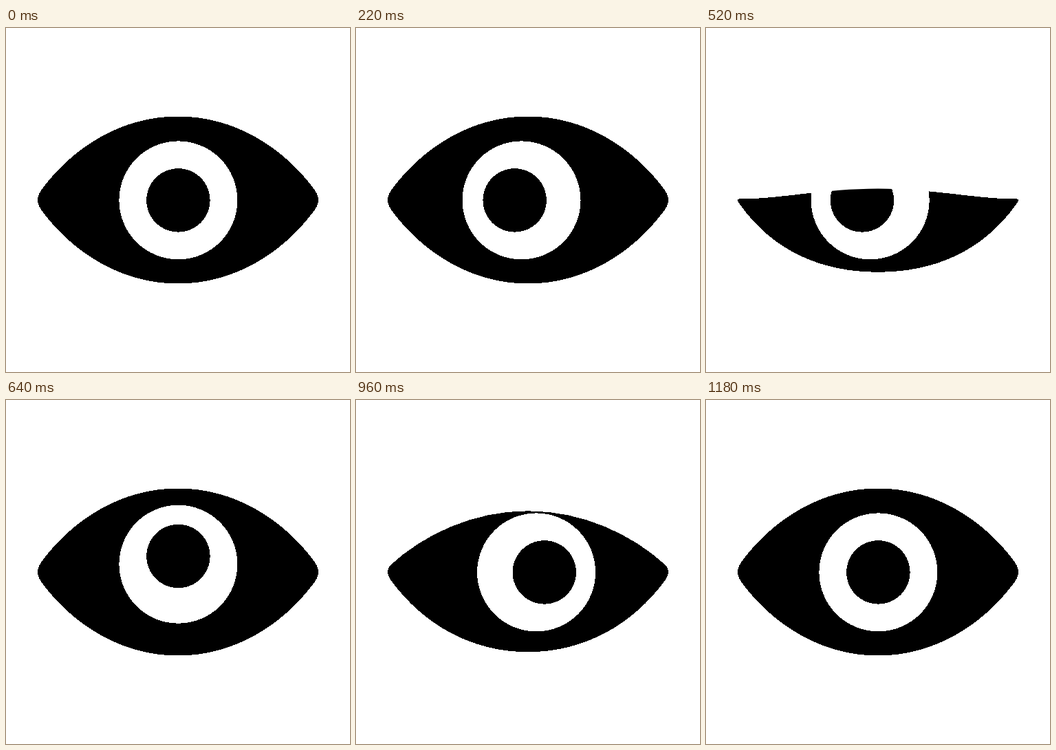
An HTML page that plays this animation: 500 px wide and 500 px high, repeating every 1.34 s.

```html
<!DOCTYPE html>
<html lang="en">
<head>
<meta charset="utf-8">
<title>Blinking eye</title>
<style>
  html, body { margin: 0; width: 100%; height: 100%; overflow: hidden; background: #fff; }
  svg { display: block; width: 100vw; height: 100vh; shape-rendering: crispEdges; }
</style>
</head>
<body>
<svg viewBox="0 0 500 500">
  <defs><clipPath id="opening"><path id="clip"/></clipPath></defs>
  <path id="eye"/>
  <circle id="iris" r="86" fill="#fff"/>
  <g clip-path="url(#opening)"><circle id="pupil" r="46.2"/></g>
</svg>
<script>
const LOOP = 1340, STEP = 20, MOVE = 80;
const BLINKS = [0, 400, 940];
const LOOKS = [
  { at: 160, x: -1, y: 0 },
  { at: 560, x: 0, y: -1 },
  { at: 700, x: 1, y: 0 },
  { at: 1100, x: 0, y: 0 }
];

// Left half of each lid: corner, two handles, middle of the lid.
const UPPER = {
  open: [[51.2, 235.6], [98, 172], [169, 128.5], [250, 128.5]],
  shut: [[47, 260.5], [98, 328], [169, 338.5], [250, 338.5]]
};
const LOWER = {
  open: UPPER.open.map(([x, y]) => [x, 500 - y]),
  shut: [[47, 248], [98, 322], [169, 338], [250, 338]]
};
const TIP = [46, 250];

const [eye, clip, iris, pupil] =
  ['eye', 'clip', 'iris', 'pupil'].map(id => document.getElementById(id));

const mix = (a, b, k) => a + (b - a) * k;
const mirror = ([x, y]) => [500 - x, y];
const curve = (...points) => 'C' + points.join(' ');

function lidAt(lid, shut) {
  return lid.open.map((p, i) => p.map((v, j) => mix(v, lid.shut[i][j], shut)));
}

function ease(v) {
  const k = Math.min(1, Math.max(0, v));
  return k * k * (3 - 2 * k);
}

function eyePath(shut) {
  const up = lidAt(UPPER, shut);
  const low = lidAt(LOWER, shut);
  const bend = ([, y]) => [TIP[0], mix(TIP[1], y, 0.5)];
  return 'M' + TIP +
    curve(TIP, bend(up[0]), up[0]) +
    curve(up[1], up[2], up[3]) +
    curve(mirror(up[2]), mirror(up[1]), mirror(up[0])) +
    curve(mirror(bend(up[0])), mirror(TIP), mirror(TIP)) +
    curve(mirror(TIP), mirror(bend(low[0])), mirror(low[0])) +
    curve(mirror(low[1]), mirror(low[2]), low[3]) +
    curve(low[2], low[1], low[0]) +
    curve(bend(low[0]), TIP, TIP) + 'Z';
}

function shutAt(t) {
  const start = BLINKS.filter(b => b <= t).pop();
  return ease(1 - Math.abs((t - start) / MOVE - 1));
}

function gazeAt(t) {
  let x = 0, y = 0;
  for (const look of LOOKS) {
    const k = ease((t - look.at) / MOVE);
    x = mix(x, look.x, k);
    y = mix(y, look.y, k);
  }
  return [x, y];
}

function place(circle, [x, y], reach) {
  circle.setAttribute('cx', 250.4 + x * reach);
  circle.setAttribute('cy', 250.4 + y * reach);
}

function draw(ms) {
  let t = Math.floor((ms % LOOP) / STEP) * STEP;
  if (t < 2 * STEP) t = 0; // the open eye rests for two steps
  const d = eyePath(shutAt(t));
  const gaze = gazeAt(t);
  eye.setAttribute('d', d);
  clip.setAttribute('d', d);
  place(iris, gaze, 11.7);
  place(pupil, gaze, 23.4);
}

const start = performance.now();
function tick() {
  draw(performance.now() - start);
  requestAnimationFrame(tick);
}
tick();
</script>
</body>
</html>
```
